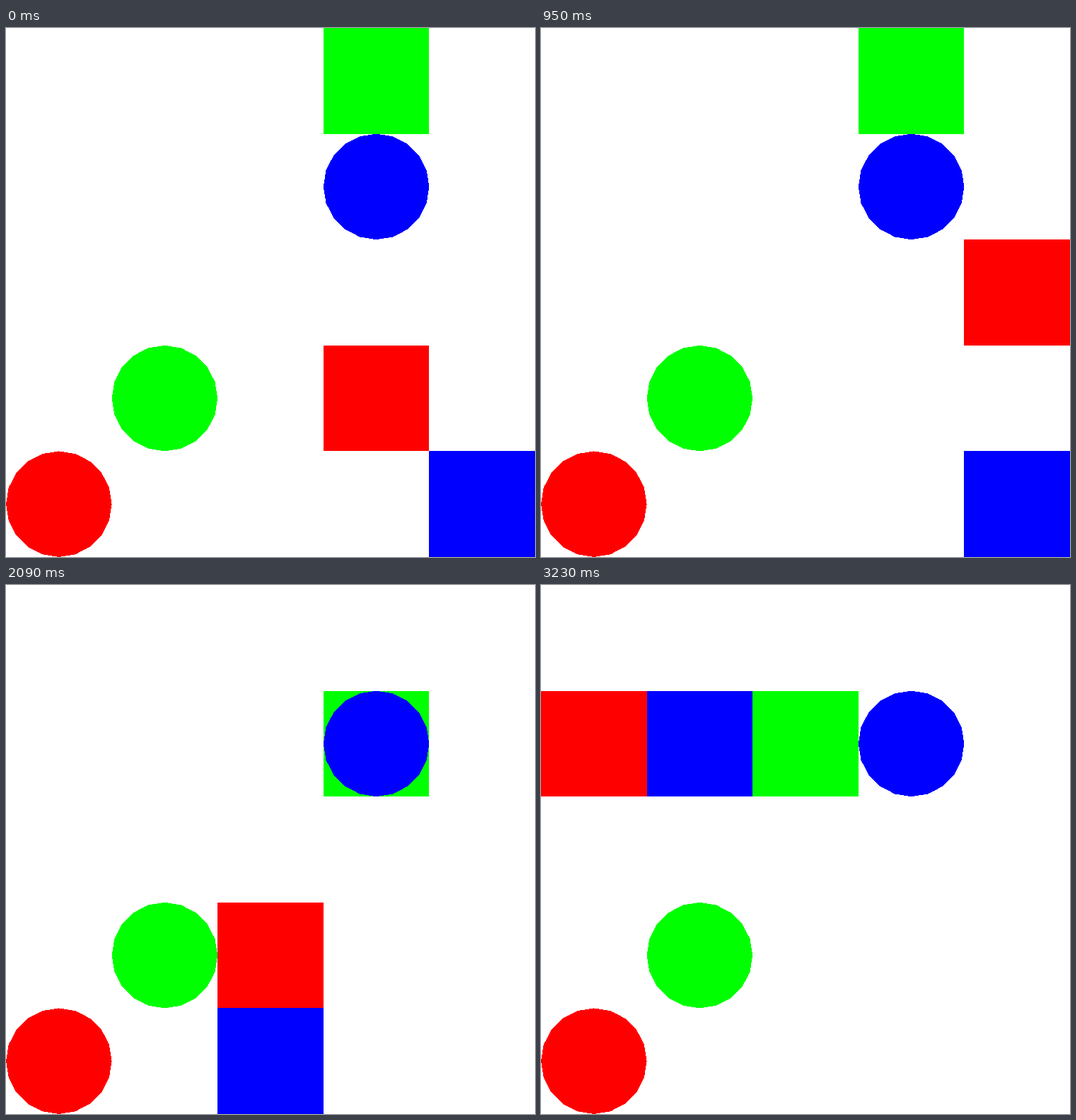
Recreate the animation shown at these times as an HTML page with a canvas. Size 748 by 748 pixels, loop 3.61 s.

```html
<!DOCTYPE html>
<html>
<head>
<meta charset="utf-8">
<title>Grid walkers</title>
<style>
html, body { margin: 0; width: 100%; height: 100%; overflow: hidden; background: #fff; }
canvas { display: block; }
</style>
</head>
<body>
<canvas id="stage" width="748" height="748"></canvas>
<script>
const ctx = document.getElementById('stage').getContext('2d');
const SIZE = 748, CELL = SIZE / 5, STEP = 190, STEPS = 19;
const MOVES = { L: [-1, 0], R: [1, 0], U: [0, -1], D: [0, 1], '.': [0, 0] };

// One move per step; each walker has a fixed round goal of its colour.
const walkers = [
  { color: '#f00', start: [3, 3], goal: [0, 4], moves: 'R.LURD.LLLRUL.L.U.' },
  { color: '#0f0', start: [3, 0], goal: [1, 3], moves: 'L.RRL.LDRLR.LRDLU.' },
  { color: '#00f', start: [4, 4], goal: [3, 1], moves: '.......LL..UL.UU..' }
];

function cellAt(walker, step) {
  let [x, y] = walker.start;
  for (const m of walker.moves.slice(0, step)) {
    x += MOVES[m][0];
    y += MOVES[m][1];
  }
  return [x, y];
}

function square([col, row]) {
  const x = Math.round(col * CELL), y = Math.round(row * CELL);
  ctx.fillRect(x, y, Math.round((col + 1) * CELL) - x, Math.round((row + 1) * CELL) - y);
}

// Twenty-sided disc, filled row by row to keep hard edges.
function disc([col, row]) {
  const r = CELL / 2, cx = col * CELL + r, cy = row * CELL + r;
  const side = Math.PI / 10, apothem = r * Math.cos(side / 2);
  for (let y = Math.round(cy - r); y < Math.round(cy + r); y++) {
    const dy = Math.abs(y + 0.5 - cy);
    let half = r;
    for (let k = 0; k < 5; k++) {
      const a = (k + 0.5) * side;
      half = Math.min(half, (apothem - dy * Math.sin(a)) / Math.cos(a));
    }
    const x = Math.round(cx - half);
    ctx.fillRect(x, y, Math.max(0, Math.round(cx + half) - x), 1);
  }
}

function draw(step) {
  ctx.fillStyle = '#fff';
  ctx.fillRect(0, 0, SIZE, SIZE);
  for (const w of walkers) {
    ctx.fillStyle = w.color;
    disc(w.goal);
    square(cellAt(w, step));
  }
}

const begin = performance.now();
function tick() {
  draw(Math.floor((performance.now() - begin) / STEP) % STEPS);
  requestAnimationFrame(tick);
}
tick();
</script>
</body>
</html>
```
